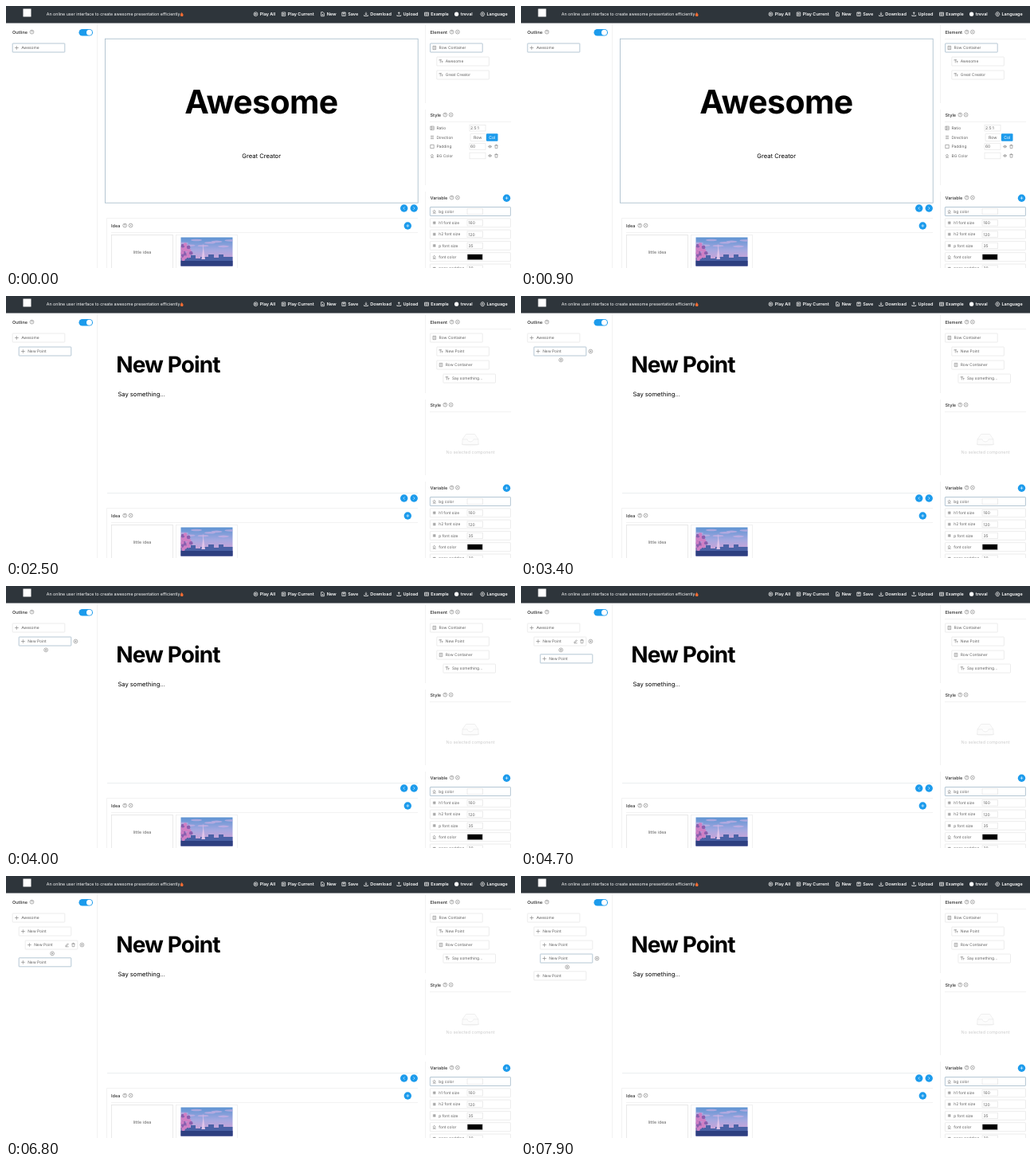
An HTML page for the animation above (8 s loop, 639 by 329 pixels).

```html
<!DOCTYPE html>
<html lang="en">
<head>
<meta charset="utf-8">
<title>Slide editor</title>
<style>
html, body { margin: 0; width: 100%; height: 100%; overflow: hidden; background: #fff; }
svg { display: block; width: 639px; height: 329px; font-family: Inter, Roboto, sans-serif; text-rendering: geometricPrecision; }
</style>
</head>
<body>
<svg id="stage" viewBox="0 0 639 329">
  <defs>
    <linearGradient id="sky" x2="0" y2="1">
      <stop stop-color="#5c93d2"/><stop offset=".45" stop-color="#a5a8e0"/><stop offset=".8" stop-color="#d3a3d6"/>
    </linearGradient>
    <clipPath id="photo"><path d="M219.5 290.5h65v36h-65z"/></clipPath>
  </defs>
  <g id="fixed"></g><g id="live"></g>
</svg>
<script>
const INK = '#606060', BLUE = '#1c9bec', LIGHT = '#e8e8e8', ACTIVE = '#a3b9c9';
const $ = id => document.getElementById(id);

const text = (x, y, s, size = 5, fill = INK, more = '') =>
  `<text x="${x}" y="${y}" font-size="${size}" fill="${fill}" ${more}>${s}</text>`;
const bold = (x, y, s, size = 5.4, fill = '#444') => text(x, y, s, size, fill, 'font-weight="600"');
const rect = (x, y, w, h, fill, stroke = 'none', r = 0) =>
  `<rect x="${x}" y="${y}" width="${w}" height="${h}" rx="${r}" fill="${fill}" stroke="${stroke}" stroke-width=".8"/>`;
const disc = (x, y, r, fill) => `<circle cx="${x}" cy="${y}" r="${r}" fill="${fill}"/>`;
const line = (d, stroke = '#ececec', w = .7) => `<path d="${d}" fill="none" stroke="${stroke}" stroke-width="${w}"/>`;

// Small icons, drawn around their own centre
const RING = 'M-2.4 0a2.4 2.4 0 1 0 4.8 0a2.4 2.4 0 1 0 -4.8 0';
const BOX = 'M-2.2-2.2h4.4v4.4h-4.4z';
const PLAY = 'M-.7-1.1L1.1 0L-.7 1.1z';
const TRAY = 'M-2.4 1v1.3h4.8V1';
const ICONS = {
  playAll: RING + PLAY,
  playOne: BOX + PLAY,
  file: 'M-1.9-2.5h2.4l1.4 1.4v3.6h-3.8zM-.8.6h1.6M0-.2v1.6',
  save: BOX + 'M-1-2.2v1.4h2v-1.4M-.7.8h1.4',
  down: TRAY + 'M0-2.5v3.4M-1.3-.3L0 .9L1.3-.3',
  up: TRAY + 'M0 1v-3.4M-1.3-1.1L0-2.4L1.3-1.1',
  book: 'M-2.5-2h5v4h-5zM0-2v4M-1.6-.6h.8M.8-.6h.8M-1.6.6h.8M.8.6h.8',
  gear: 'M-1.1-2.4h2.2l1.5 2.4l-1.5 2.4h-2.2L-2.6 0zM-.8 0a.8.8 0 1 0 1.6 0a.8.8 0 1 0 -1.6 0',
  help: RING + 'M-.8-.6C-.6-1.8.9-1.4.7-.5C.6 0 0 0 0 .6M0 1.1v.4',
  close: RING + 'M-.8-.8L.8.8M.8-.8L-.8.8',
  add: RING + 'M-1.1 0h2.2M0-1.1v2.2',
  move: 'M-2.4 0h4.8M0-2.4v4.8',
  box: 'M-1.8-2.2h3.6v4.4h-3.6zM-.8-.8h1.6M-.8.7h1.6',
  type: 'M-2.2-1.1v-.8h3v.8M-.7-1.9v3.8M.6 0h1.9M1.5 0v1.9',
  ratio: BOX + 'M-.7-2.2v4.4M-.7 0h2.9',
  rows: 'M-2-1.7h4M-2 0h4M-2 1.7h4',
  square: BOX,
  bucket: 'M-1.6-.3L0-2l1.5 2.2l-2 1.3zM-1.9 2.1h4',
  hash: 'M-.8-1.8v3.6M.8-1.8v3.6M-1.8-.8h3.6M-1.8.8h3.6',
  eye: 'M-2.3 0Q0-3 2.3 0Q0 3-2.3 0zM-.6 0a.6.6 0 1 0 1.2 0a.6.6 0 1 0 -1.2 0',
  trash: 'M-2-1.4h4M-.7-1.4v-.8h1.4v.8M-1.5-1.4l.2 3.6h2.6l.2-3.6',
  pen: 'M-1.6.9L.9-1.8l.9.9L-.8 1.5l-1 .2zM-2 2.3h4',
  plus: 'M-1.9 0h3.8M0-1.9v3.8',
  prev: 'M.8-1.7L-.9 0L.8 1.7',
  next: 'M-.8-1.7L.9 0L-.8 1.7'
};
const icon = (name, x, y, stroke = '#707070', w = .55) =>
  `<g transform="translate(${x} ${y})">${line(ICONS[name], stroke, w)}</g>`;
const button = (name, x, y) => disc(x, y, 4.7, BLUE) + icon(name, x, y, '#fff', .6);
const title = (x, y, s, helpX, closable = true) => bold(x, y + 2, s, 5.5) +
  icon('help', helpX, y - .4) + (closable ? icon('close', helpX + 7.3, y - .4) : '');
const node = (x, y, kind, label, active) =>
  rect(x, y - 5.5, 65.6, 11, '#fff', active ? ACTIVE : LIGHT, .5) +
  icon(kind, x + 5.2, y) + text(x + 11, y + 1.7, label, 4.9);

function header() {
  const menu = [
    ['playAll', 313.5, 'Play All'], ['playOne', 348.5, 'Play Current'], ['file', 397.5, 'New'],
    ['save', 424, 'Save'], ['down', 452, 'Download'], ['up', 493.3, 'Upload'],
    ['book', 528, 'Example'], ['', 565.6, 'treval'], ['gear', 598.3, 'Language']];
  return rect(0, 0, 639, 21.5, '#2e353b') + rect(21.5, 3.5, 10, 10, '#fff') +
    text(50.8, 12, 'An online user interface to create awesome presentation efficiently', 5.3, '#fff') +
    '<path d="M220.4 7.2q.2 1.5 1.4 2.3q1.2 1.2.7 2.4q-.4 1.2-1.8 1.2q-1.6 0-1.9-1.5q-.1-1.2.8-2q1-.9.8-2.4z" fill="#f36b32"/>' +
    menu.map(([name, x, label]) =>
      (name ? icon(name, x, 10.2, '#fff', .7) : disc(x, 10.2, 2.6, '#fff')) +
      bold(x + 5.2, 12, label, 5.5, '#fff')).join('');
}

function picture() {
  let tree = '', clouds = '';
  for (let i = 0; i < 24; i++) {
    const reach = 10 * Math.sqrt(i / 24), turn = i * 2.4;
    tree += disc(223 + reach * Math.cos(turn), 309 + reach * Math.sin(turn), 2.3, i % 3 ? '#cf7fc4' : '#8a5fae');
    if (i < 8) clouds += `<ellipse cx="${222 + i * 8.5}" cy="${298 + 4 * Math.sin(turn)}" rx="7" ry="1.3" fill="#d5b3e4" opacity=".6"/>`;
  }
  return `<g clip-path="url(#photo)">${rect(219, 290, 66, 37, 'url(#sky)')}${clouds}
    <path d="M219 316h13v-3h6v4h6v-2h10v-3h7v4h6v-4h6v3h12v14h-66z" fill="#4b62a6"/>
    <path d="M247.7 298l.5 8l1.8 12h-4.6l1.8-12z" fill="#dfc4e8"/>${tree}
    ${rect(219, 320, 66, 7, '#2d3f80')}</g>`;
}

function variables() {
  const rows = [['bucket', 'bg color', ''], ['hash', 'h1 font size', 160], ['hash', 'h2 font size', 120],
    ['hash', 'p font size', 35], ['bucket', 'font color', ''], ['hash', 'page padding', 20]];
  return rows.map(([kind, label, value], i) => {
    const y = 258 + i * 14.3;
    return rect(532.4, y - 5.5, 101, 11, '#fff', i ? LIGHT : ACTIVE, .5) + icon(kind, 537.7, y) +
      text(543.3, y + 1.8, label, 4.9) +
      rect(579, y - 3.7, 19.5, 7.4, i == 4 ? '#000' : '#fff', LIGHT) + text(580.5, y + 1.9, value, 5);
  }).join('');
}

$('fixed').innerHTML = header() +
  line('M114.5 22V329M526.5 23V122M526.5 130V225M526.5 233V329M126.5 329V266.5H517') +
  line('M532 41.5H634M532 145.5H634M132 284.5H517') +
  title(8, 33, 'Outline', 32.5, false) +
  rect(91.5, 29, 17.5, 8.6, BLUE, 'none', 4.3) + disc(104.5, 33.3, 3.5, '#fff') +
  title(532.5, 33, 'Element', 559.6) + title(532.5, 137, 'Style', 551.3) +
  title(532.5, 241, 'Variable', 559.6) + title(132, 276, 'Idea', 149.2) +
  button('plus', 628.5, 241.2) + button('plus', 504.3, 276) +
  button('prev', 499.7, 254) + button('next', 512.2, 254) +
  rect(132.5, 287.5, 77, 50, '#fff', '#e4e4e4') + text(171, 311, 'little idea', 5.3, INK, 'text-anchor="middle"') +
  rect(213.5, 287.5, 77, 50, '#fff', '#eee') + picture() + variables();

const field = (y, value = '') => rect(582, y - 3.8, 20, 7.6, '#fff', LIGHT) + text(583, y + 1.9, value, 5);

function coverSlide() {
  const labels = [['ratio', 'Ratio'], ['rows', 'Direction'], ['square', 'Padding'], ['bucket', 'BG Color']];
  const tools = y => icon('eye', 607.6, y) + icon('trash', 615.5, y);
  return rect(124.4, 41.2, 392.8, 206, '#fff', ACTIVE) +
    text(320.5, 135, 'Awesome', 41, '#000', 'font-weight="700" text-anchor="middle" letter-spacing="-.6"') +
    text(320.7, 191.3, 'Great Creator', 7.6, '#000', 'text-anchor="middle"') +
    node(532.6, 52.5, 'box', 'Row Container', true) +
    node(540.8, 69.5, 'type', 'Awesome') + node(540.8, 86.5, 'type', 'Great Creator') +
    labels.map(([kind, label], i) => icon(kind, 535, 153.3 + i * 11.6) +
      text(540.5, 155 + i * 11.6, label, 4.9)).join('') +
    field(153.2, '2.5:1') + field(176.5, 60) + field(188) + tools(176.5) + tools(188) +
    rect(583, 160.3, 19.5, 9.4, '#fff', LIGHT, 1) + text(587, 166.9, 'Row', 5.2) +
    rect(603, 160.3, 14.5, 9.4, BLUE, 'none', 1) + text(606.2, 166.9, 'Col', 5.2, '#fff');
}

function pointSlide() {
  return line('M127 247.5H517', '#e3e7ea') +
    text(138.2, 96, 'New Point', 28, '#000', 'font-weight="700" letter-spacing="-.9"') +
    text(140.4, 126, 'Say something...', 7.6, '#000') +
    node(532.6, 52.5, 'box', 'Row Container') + node(540.8, 69.5, 'type', 'New Point') +
    node(540.8, 86.5, 'box', 'Row Container') + node(548.9, 103.5, 'type', 'Say something...') +
    '<ellipse cx="583" cy="186" rx="11.5" ry="2.5" fill="#f7f7f7"/>' +
    '<path d="M573 180l4.5-6.5h11L593 180v6.5h-20zM573 180h6q.5 3 4 3t4-3h6" fill="#fcfcfc" stroke="#e6e6e6" stroke-width=".6"/>' +
    text(583, 198.2, 'No selected component', 5.4, '#ccc', 'text-anchor="middle"');
}

// Outline entries in list order; hover and edit are [from, to] spans in ms
const entries = [
  { born: 0, depth: 0, label: 'Awesome', hover: [1300, 2500], edit: [[1300, 1900]] },
  { born: 2500, depth: 1, label: 'New Point', hover: [2900, 5700], edit: [[2900, 3200], [3700, 3900], [4600, 5200]] },
  { born: 4400, depth: 2, label: 'New Point', hover: [5700, 7900], edit: [[6400, 7000]] },
  { born: 7900, depth: 2, label: 'New Point', hover: [7900, 8000], edit: [] },
  { born: 5700, depth: 1, label: 'New Point', hover: [0, 0], edit: [] }
];

function outline(t) {
  const within = ([from, to]) => t >= from && t < to;
  const shown = entries.filter(e => t >= e.born);
  const newest = Math.max(...shown.map(e => e.born));
  let y = 52.5, out = '';
  for (const e of shown) {
    const x = 8.2 + e.depth * 8;
    out += node(x, y, 'move', e.label, e.born == newest);
    if (e.edit.some(within)) out += icon('pen', x + 52.4, y) + icon('trash', x + 60.3, y);
    if (within(e.hover)) {
      out += icon('add', x + 71.2, y);
      if (e.depth) {
        out += icon('add', x + 33.9, y + 10.8);
        y += 4.8;
      }
    }
    y += 17;
  }
  return out;
}

let last = '';
function frame() {
  const t = performance.now() % 8000;
  const view = (t < 2500 ? coverSlide() : pointSlide()) + outline(t);
  if (view !== last) $('live').innerHTML = last = view;
  requestAnimationFrame(frame);
}
frame();
</script>
</body>
</html>
```
